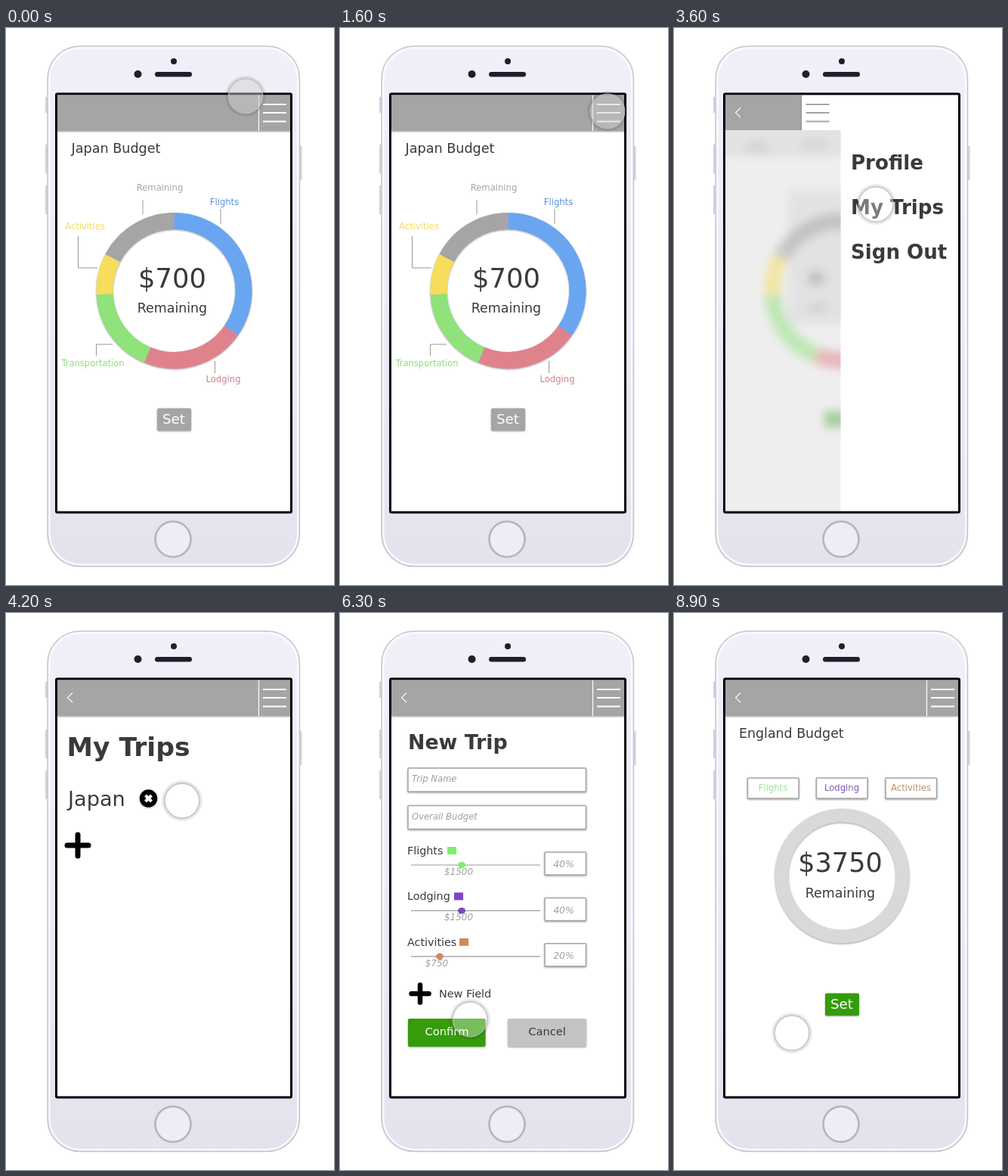
These frames come from a looping animation (434x736 px, 9 s). An HTML page:

```html
<!DOCTYPE html>
<html lang="en">
<head>
<meta charset="utf-8">
<title>Trip budget</title>
<style>
html, body { margin: 0; width: 100%; height: 100%; overflow: hidden; background: #fff; }
svg { display: block; width: 434px; height: 736px; }
text { font-family: "DejaVu Sans", sans-serif; fill: #3a3a3a; }
.b { font-weight: bold; }
.i { font-style: italic; fill: #a0a0a0; }
.m { text-anchor: middle; }
.line { fill: none; stroke: #999; stroke-width: 1; }
.lift { filter: drop-shadow(0 1.5px 1.2px rgba(0,0,0,.38)); }
</style>
</head>
<body>
<svg viewBox="0 0 434 736" xmlns="http://www.w3.org/2000/svg">
<defs>
  <linearGradient id="body" x1="0" y1="0" x2="0" y2="1">
    <stop offset="0" stop-color="#f1f0f9"/><stop offset=".5" stop-color="#eceaf5"/><stop offset="1" stop-color="#e4e2ed"/>
  </linearGradient>
  <radialGradient id="halo">
    <stop offset=".8" stop-color="#000" stop-opacity="0"/>
    <stop offset=".83" stop-color="#000" stop-opacity=".16"/>
    <stop offset="1" stop-color="#000" stop-opacity="0"/>
  </radialGradient>
  <filter id="blur" filterUnits="userSpaceOnUse" x="30" y="80" width="330" height="600"><feGaussianBlur stdDeviation="6"/></filter>
  <clipPath id="side"><rect x="68" y="135" width="152.500" height="504"/></clipPath>
</defs>
<g id="phone"></g>
<g id="screens"></g>
<rect x="66.500" y="87" width="311" height="553" rx="1.500" fill="none" stroke="#000" stroke-width="3"/>
<g id="touch">
  <circle r="28" fill="url(#halo)"/>
  <circle id="tip" r="22.800" stroke="#bebebe" stroke-opacity=".85" stroke-width="1.300"/>
</g>
</svg>
<script>
const $ = id => document.getElementById(id);
const GRAY = '#a5a5a6', GREEN = '#359c0b';

const rect = (x, y, w, h, fill, more = '') =>
  `<rect x="${x}" y="${y}" width="${w}" height="${h}" fill="${fill}" ${more}/>`;
const text = (x, y, size, str, cls = '', fill = '') =>
  `<text x="${x}" y="${y}" font-size="${size}" class="${cls}" ${fill && `style="fill:${fill}"`}>${str}</text>`;
const path = (d, stroke, width, more = '') =>
  `<path d="${d}" fill="none" stroke="${stroke}" stroke-width="${width}" ${more}/>`;
const circle = (x, y, r, fill, more = '') =>
  `<circle cx="${x}" cy="${y}" r="${r}" fill="${fill}" ${more}/>`;
const box = (x, y, w, h) => rect(x, y, w, h, '#fff', 'rx="1" stroke="#a6a6a6" stroke-width="1.5" class="lift"');
const button = (x, y, w, h, fill) => rect(x, y, w, h, fill, 'rx="2" class="lift"');
const burger = (x, color) => path([101, 112, 123.5].map(y => `M${x} ${y}h31`).join(''), color, 2);
const back = path('M88 105.500L81.500 111.800L88 118', '#fff', 1.1);
const bar = rect(68, 89, 309, 47, GRAY, 'class="lift"') + path('M334.500 89V136', '#fff', 1.2) + burger(340, '#fff');
const setButton = fill => button(200, 502.5, 45, 29.5, fill) + text(222, 523, 18.2, 'Set', 'm', '#fff');

// Budget ring: [end angle clockwise from the top, colour]
const slices = [[125, '#6aa5f2'], [202.6, '#e0828c'], [267, '#90e27a'], [298, '#f6dd5c'], [360, GRAY]];
function ring() {
  const at = deg => {
    const a = (deg - 90) * Math.PI / 180;
    return `${222.5 + 92 * Math.cos(a)} ${347 + 92 * Math.sin(a)}`;
  };
  let from = 0;
  return slices.map(([to, color]) => {
    const d = `M${at(from)}A92 92 0 0 1 ${at(to)}`;
    from = to;
    return path(d, color, 22);
  }).join('');
}

function budget() {
  const leads = 'M181 227V246M284 239V259M95.500 275V317H121M119.500 433V418H141M276.500 440V456';
  return bar + text(86.5, 165, 17.6, 'Japan Budget') +
    `<g class="lift">${ring()}</g><path class="line" d="${leads}"/>` +
    text(203.5, 215, 11.6, 'Remaining', 'm', GRAY) +
    text(289, 234, 11.6, 'Flights', 'm', '#5b93dc') +
    text(104.5, 266, 11.6, 'Activities', 'm', '#f3db62') +
    text(115, 447, 11.5, 'Transportation', 'm', '#8ddd78') +
    text(287.5, 468, 11.6, 'Lodging', 'm', '#cf7f88') +
    text(220, 343, 35.3, '$700', 'm') + text(220, 376, 17.4, 'Remaining', 'm') + setButton(GRAY);
}

function menu() {
  const blob = (x, y, rx, ry, fill) => `<ellipse cx="${x}" cy="${y}" rx="${rx}" ry="${ry}" fill="${fill}"/>`;
  const haze = rect(60, 125, 170, 45, '#e2e2e2') + rect(152, 215, 80, 175, '#e2e2e2') +
    blob(110, 158, 16, 7, '#d2d2d2') + blob(186, 155, 20, 7, '#d6d6d6') +
    blob(188, 331, 12, 11, '#c4c4c4') + blob(190, 370, 15, 6, '#cfcfcf') +
    rect(199, 506, 36, 22, '#a9cfa0') + `<g opacity=".5">${ring()}</g>`;
  return rect(68, 89, 100, 46.5, GRAY) + path('M168.500 89V135', '#8e8e8e', 1) + back + burger(174.5, GRAY) +
    `<g clip-path="url(#side)">${rect(68, 135, 153, 504, '#eeeeee')}<g filter="url(#blur)">${haze}</g></g>` +
    ['Profile', 'My Trips', 'Sign Out'].map((s, i) => text(234, 186.5 + 59 * i, 26.1, s, 'b')).join('');
}

function trips() {
  return bar + back + text(80.5, 189, 34.6, 'My Trips', 'b') + text(82, 255, 27.2, 'Japan') +
    circle(188.5, 245, 11.7, '#000', 'class="lift"') +
    path('M184.500 241L192.500 249M192.500 241L184.500 249', '#fff', 4) +
    path('M95 293V321M81 307H109', '#000', 7, 'stroke-linecap="round"');
}

function form() {
  const rows = [
    ['Flights', '#7cf06a', 142, 161, '$1500', '40%'],
    ['Lodging', '#8045c5', 151, 161, '$1500', '40%'],
    ['Activities', '#cc8a60', 158, 132, '$750', '20%']
  ];
  return bar + back + text(90, 179.5, 26.8, 'New Trip', 'b') +
    box(90, 205, 235.5, 31) + text(95, 223, 11.6, 'Trip Name', 'i') +
    box(90, 254.5, 235.5, 31) + text(95, 273, 11.6, 'Overall Budget', 'i') +
    rows.map(([name, color, sx, dot, sum, part], i) => {
      const y = 333 + 60.4 * i;
      return text(89, y - 14, 14.3, name) + rect(sx, y - 24, 12, 10, color) +
        path(`M94 ${y}H265`, '#999', 1.2) +
        `<ellipse cx="${dot}" cy="${y}" rx="5" ry="4.200" fill="${color}"/>` +
        text(dot - 4, y + 13, 12, sum, 'i m') +
        box(271, y - 17, 54.5, 30) + text(296, y + 3.2, 12.4, part, 'i m');
    }).join('') +
    path('M106 491.500V514.500M94.500 503H117.500', '#000', 6.5, 'stroke-linecap="round"') +
    text(131, 508, 14.4, 'New Field') +
    button(90, 536, 102.5, 37, GREEN) + text(141.5, 558, 14.7, 'Confirm', 'm', '#fff') +
    button(222, 536, 104, 37, '#c3c3c3') + text(274, 558, 14.6, 'Cancel', 'm');
}

function fresh() {
  const chips = [['Flights', '#9be59a', 131], ['Lodging', '#7d58b0', 222], ['Activities', '#bd946a', 313.5]];
  return bar + back + text(86, 165, 17.4, 'England Budget') +
    chips.map(([s, color, x]) => box(x - 33.5, 218, 67.5, 27) + text(x, 235, 11.6, s, 'm', color)).join('') +
    circle(222.5, 347.5, 80, 'none', 'stroke="#d9d9d9" stroke-width="18" class="lift"') +
    text(220, 342, 35, '$3750', 'm') + text(220, 376, 17.4, 'Remaining', 'm') + setButton(GREEN);
}

$('phone').innerHTML =
  [[91, 21], [154, 38], [208, 38]].map(([y, h]) => rect(52, y, 3, h, '#d3d2da')).join('') +
  rect(388.5, 156, 3, 45, '#d3d2da') +
  rect(55, 24, 333.5, 687.5, 'url(#body)', 'rx="43" stroke="#c6c6cc" stroke-width="1.5"') +
  rect(57.5, 26.5, 328.5, 682.5, 'none', 'rx="41" stroke="#fbfbff" stroke-width="2"') +
  circle(222, 44, 4, '#1f1e2e') + circle(174.5, 61, 5, '#1f1e2e') +
  rect(197, 58, 49, 6.5, '#1f1e2e', 'rx="3.25"') +
  circle(221, 675.5, 23.5, '#eeecf5', 'stroke="#b4b3c0" stroke-width="2.6"') +
  rect(66, 87, 312, 553, '#fff');

const screens = [[0, budget], [1700, menu], [3800, trips], [5500, form], [7800, fresh]];
$('screens').innerHTML = screens.map(([, draw]) => `<g>${draw()}</g>`).join('');
const layers = [...$('screens').children];

const ease = {
  in: u => u * u,
  out: u => 1 - (1 - u) * (1 - u),
  both: u => u * u * (3 - 2 * u)
};
// Touch path: time, x, y, easing on the way there
const stops = [
  [0, 317, 90], [500, 354, 110, 'out'], [2000, 354, 110, 'both'], [2200, 300, 105, 'in'],
  [2700, 267, 233, 'out'], [4000, 267, 233, 'both'], [4700, 95, 309, 'both'], [5900, 95, 309, 'both'],
  [6300, 172, 537, 'both'], [6900, 156, 555, 'both'], [9000, 156, 555, 'both']
];

function touchAt(t) {
  const k = stops.findIndex(s => s[0] > t);
  const [t0, x0, y0] = stops[k - 1], [t1, x1, y1, kind] = stops[k];
  const u = ease[kind]((t - t0) / (t1 - t0));
  return [x0 + (x1 - x0) * u, y0 + (y1 - y0) * u];
}

function render(ms) {
  const t = Math.floor(ms % 9000 / 100) * 100;
  const now = screens.filter(s => s[0] <= t).length - 1;
  layers.forEach((g, i) => g.setAttribute('display', i === now ? 'inline' : 'none'));
  $('touch').setAttribute('transform', `translate(${touchAt(t)})`);
  $('tip').setAttribute('fill', now ? 'rgba(255,255,255,.33)' : 'rgba(205,205,205,.45)');
}

const start = performance.now();
function tick() {
  render(performance.now() - start);
  requestAnimationFrame(tick);
}
tick();
</script>
</body>
</html>
```
